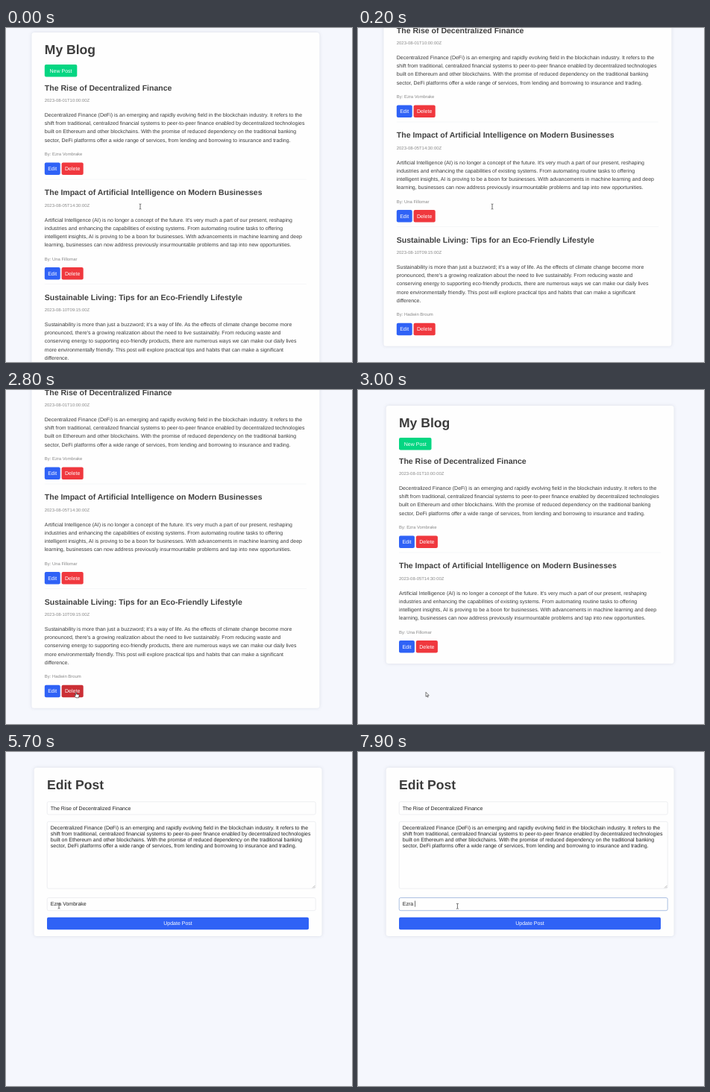
An HTML page that plays this animation: 464 by 448 pixels, repeating every 8000 ms.

```html
<!DOCTYPE html>
<html lang="en">
<head>
<meta charset="utf-8">
<title>My Blog</title>
<style>
  html, body { margin: 0; width: 100%; height: 100%; overflow: hidden; background: #f5f7fd; }
  svg { display: block; width: 100%; height: 100%; }
  text { font-family: "Liberation Sans", Arial, sans-serif; font-size: 7.02px; fill: #3c3c3c;
         white-space: pre; text-rendering: geometricPrecision; }
  .h1 { font-size: 17.54px; font-weight: bold; }
  .h2 { font-size: 10.53px; font-weight: bold; fill: #414141; }
  .meta { font-size: 5.92px; fill: #888; }
  .field { fill: #222; }
  .label { fill: #fff; }
  .card { fill: #fefefe; filter: drop-shadow(0 0 2.2px rgba(30, 40, 70, .13)); }
  .box { fill: #fefefe; stroke: #e2e4e9; stroke-width: .6; }
</style>
</head>
<body>
<svg id="stage" viewBox="0 0 464 448"></svg>
<script>
const DURATION = 8000, STEP = 100;
const LINE = 11.23, POST_PITCH = 140.5;
const BLUE = [47, 98, 246], RED = [240, 56, 62], DARK_RED = [203, 47, 53];
const BORDER = [226, 228, 233], FOCUS = [118, 152, 208];
const AUTHOR = "Ezra Vombrake";

const posts = [
  { title: "The Rise of Decentralized Finance", date: "2023-08-01T10:00:00Z", by: AUTHOR, lines: [
    "Decentralized Finance (DeFi) is an emerging and rapidly evolving field in the blockchain industry. It refers to the",
    "shift from traditional, centralized financial systems to peer-to-peer finance enabled by decentralized technologies",
    "built on Ethereum and other blockchains. With the promise of reduced dependency on the traditional banking",
    "sector, DeFi platforms offer a wide range of services, from lending and borrowing to insurance and trading."] },
  { title: "The Impact of Artificial Intelligence on Modern Businesses", date: "2023-08-05T14:30:00Z", by: "Una Fillomar", lines: [
    "Artificial Intelligence (AI) is no longer a concept of the future. It's very much a part of our present, reshaping",
    "industries and enhancing the capabilities of existing systems. From automating routine tasks to offering",
    "intelligent insights, AI is proving to be a boon for businesses. With advancements in machine learning and deep",
    "learning, businesses can now address previously insurmountable problems and tap into new opportunities."] },
  { title: "Sustainable Living: Tips for an Eco-Friendly Lifestyle", date: "2023-08-10T09:15:00Z", by: "Hadwin Broum", lines: [
    "Sustainability is more than just a buzzword; it's a way of life. As the effects of climate change become more",
    "pronounced, there's a growing realization about the need to live sustainably. From reducing waste and",
    "conserving energy to supporting eco-friendly products, there are numerous ways we can make our daily lives",
    "more environmentally friendly. This post will explore practical tips and habits that can make a significant",
    "difference."] }
];

const rgb = c => `rgb(${c.map(Math.round)})`;
const mix = (a, b, k) => a.map((v, i) => v + (b[i] - v) * k);
const clamp = v => Math.max(0, Math.min(1, v));

function el(parent, tag, attrs = {}, content) {
  const node = document.createElementNS("http://www.w3.org/2000/svg", tag);
  for (const key in attrs) node.setAttribute(key, attrs[key]);
  if (content !== undefined) node.textContent = content;
  return parent.appendChild(node);
}
const group = parent => el(parent, "g");
const text = (parent, x, y, cls, content) => el(parent, "text", { x, y, class: cls }, content);
const rect = (parent, x, y, width, height, attrs) => el(parent, "rect", { x, y, width, height, ...attrs });

function button(parent, x, y, width, label, color) {
  const face = rect(parent, x, y, width, 16.6, { rx: 2, fill: rgb(color) });
  el(parent, "text", { x: x + width / 2, y: y + 10.7, class: "label", "text-anchor": "middle" }, label);
  return face;
}

const stage = document.getElementById("stage");
rect(stage, 0, 0, 464, 448, { fill: "#f5f7fd" });

// Blog list
const list = group(stage);
const listCard = rect(list, 37.6, 21, 386, 346, { rx: 3.5, class: "card" });
text(list, 55, 49.9, "h1", "My Blog");
button(list, 55, 64, 43.5, "New Post", [5, 214, 130]);

posts.forEach((post, i) => {
  const g = post.node = group(list);
  g.setAttribute("transform", `translate(0 ${i * POST_PITCH})`);
  if (i) rect(g, 55, 77.3, 351, .5, { fill: "#eceef1" });
  text(g, 55, 98.6, "h2", post.title);
  text(g, 55, 114, "meta", post.date);
  post.lines.forEach((line, n) => text(g, 55, 134 + n * LINE, "", line));
  const extra = (post.lines.length - 4) * LINE;
  text(g, 55, 186 + extra, "meta", "By: " + post.by);
  button(g, 55, 195.4 + extra, 20.9, "Edit", BLUE);
  post.remove = button(g, 77.8, 195.4 + extra, 29.1, "Delete", RED);
});

// Edit form
const form = group(stage);
rect(form, 37.6, 21, 386, 226, { rx: 3.5, class: "card" });
text(form, 55, 49.9, "h1", "Edit Post");
rect(form, 55.2, 66.7, 360, 17.2, { rx: 2, class: "box" });
text(form, 59.8, 77.6, "field", posts[0].title);
rect(form, 55.2, 93.4, 360, 89.8, { rx: 2, class: "box" });
posts[0].lines.forEach((line, n) => text(form, 59.8, 103.6 + n * 8.1, "field", line));
el(form, "path", { d: "M411 182.4l3.4-3.4M413 182.4l1.4-1.4", stroke: "#777", "stroke-width": .5 });
const authorBox = rect(form, 55.2, 195.5, 360, 17.2, { rx: 2, class: "box" });
const author = text(form, 59.8, 206.1, "field", AUTHOR);
const caret = rect(form, 0, 199.6, .6, 8, { fill: "#111" });
button(form, 55, 221.7, 351, "Update Post", BLUE);

// Pointers, each with its hot spot at the origin
const outline = { fill: "#fff", stroke: "#222", "stroke-width": .6, "stroke-linejoin": "round" };
const pointers = {
  beam: el(stage, "path", { d: "M-1.4-3.5Q0-3.5 0-2.8Q0-3.5 1.4-3.5M0-2.8V2.8M-1.4 3.5Q0 3.5 0 2.8Q0 3.5 1.4 3.5",
    fill: "none", stroke: "#333", "stroke-width": .7 }),
  arrow: el(stage, "path", { d: "M0 0V6L1.4 4.8L2.3 6.8L3.2 6.4L2.3 4.4H4.2Z", ...outline }),
  hand: el(stage, "path", { d: "M-.7.6Q0-.6.6.6V3L3.5 3.6Q4.2 3.9 4.1 4.7L3.5 7.8H-.1L-2.3 4.9Q-2.2 4-1.3 4.4L-.7 5Z", ...outline })
};

// time, x, y, pointer
const route = [
  [0, 180, 239.5, "beam"], [500, 180, 239.5, "beam"], [600, 164, 268, "beam"], [800, 108, 351, "beam"],
  [900, 101, 370, "beam"], [1000, 101, 370, "beam"], [1100, 101, 376, "arrow"], [1300, 97, 398, "hand"],
  [1600, 94, 405, "hand"], [2900, 94, 405, "hand"], [3000, 91, 405.3, "arrow"], [3100, 91, 405.3, "arrow"],
  [3200, 110, 372, "arrow"], [3300, 123, 339, "arrow"], [4000, 123, 339, "arrow"], [4200, 121, 308, "beam"],
  [4500, 112, 232, "arrow"], [4700, 98, 204, "hand"], [4900, 71.5, 203.3, "hand"], [5500, 71.5, 203.3, "hand"],
  [5600, 71, 206.5, "beam"], [6100, 71, 206.5, "beam"], [6200, 104, 206.5, "beam"], [6300, 133.4, 206.8, "beam"],
  [8000, 133.4, 206.8, "beam"]
];
const deletions = [7000, 7100, 7200, 7400, 7500, 7600, 7800, 7900];

function movePointer(t) {
  const i = route.findLastIndex(stop => stop[0] <= t);
  const [t0, x0, y0, kind] = route[i];
  const [t1, x1, y1] = route[i + 1];
  const k = (t - t0) / (t1 - t0);
  for (const name in pointers) pointers[name].style.display = name === kind ? "" : "none";
  pointers[kind].setAttribute("transform", `translate(${x0 + (x1 - x0) * k} ${y0 + (y1 - y0) * k})`);
}

const hover = (t, start, end) => clamp((t - start) / 200) * (1 - clamp((t - end) / 250));

function render(t) {
  const hasThird = t < 3000;
  const scroll = hasThird ? 15 + 77 * (1 - (1 - clamp(t / 200)) ** 2) : 0;
  list.setAttribute("transform", `translate(${hasThird ? -3.2 : 0} ${-scroll})`);
  listCard.setAttribute("height", hasThird ? 497.8 : 346);
  posts[2].node.style.display = hasThird ? "" : "none";
  posts[2].remove.setAttribute("fill", rgb(mix(RED, DARK_RED, hover(t, 1200, 3000))));
  posts[0].remove.setAttribute("fill", rgb(mix(RED, DARK_RED, hover(t, 4500, 4800))));

  const shown = clamp((t - 5500) / 200);
  list.style.opacity = 1 - shown;
  form.style.opacity = shown;

  const focus = t < 6700 ? 0 : clamp(.45 + (t - 6700) / 360);
  authorBox.style.stroke = rgb(mix(BORDER, FOCUS, focus));
  const removed = deletions.filter(time => time <= t).length;
  author.textContent = AUTHOR.slice(0, AUTHOR.length - removed);
  caret.setAttribute("x", 59.8 + author.getComputedTextLength());
  caret.style.display = focus ? "" : "none";

  movePointer(t);
}

const began = performance.now();
function tick() {
  const t = (performance.now() - began) % DURATION;
  render(Math.floor(t / STEP) * STEP);
  requestAnimationFrame(tick);
}
tick();
</script>
</body>
</html>
```
